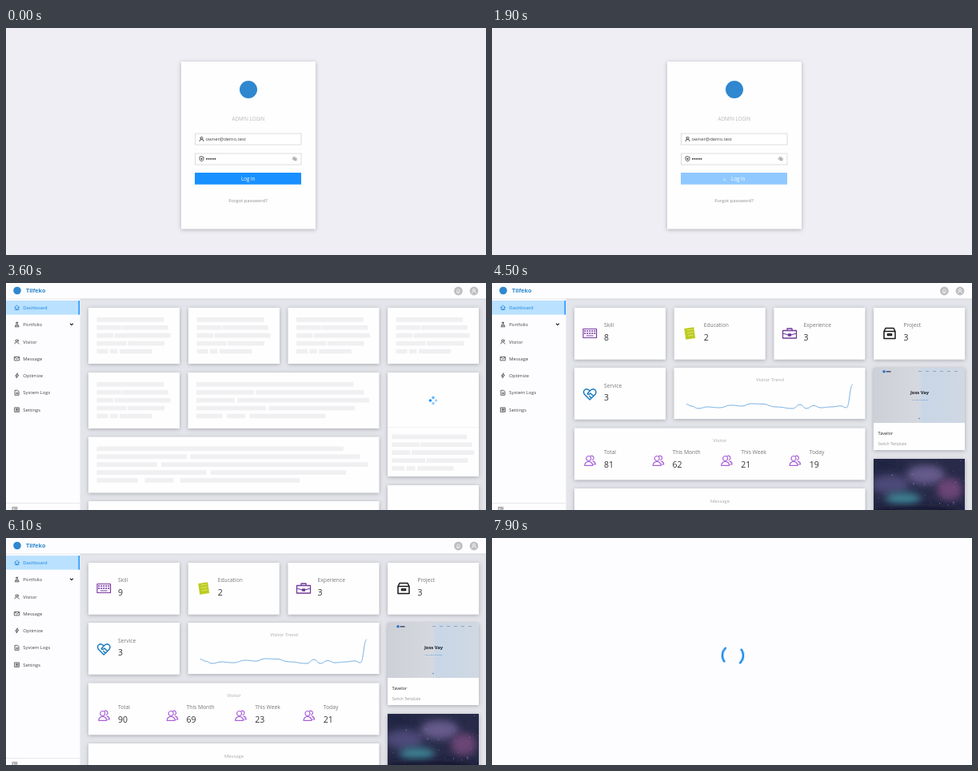
An HTML page that plays this animation: 600x284 px, repeating every 8 s.

```html
<!DOCTYPE html>
<html lang="en">
<head>
<meta charset="utf-8">
<title>Admin dashboard</title>
<style>
html, body { margin: 0; width: 100%; height: 100%; overflow: hidden; background: #fdfdff; }
svg { display: block; width: 100vw; height: 100vh; }
text { font-family: "Open Sans", "Noto Sans", sans-serif; font-size: 5.9px; fill: #444; }
.label { font-size: 6.7px; fill: #777; }
.num { font-size: 10.5px; fill: #333; }
.head { fill: #aaa; text-anchor: middle; }
.card { fill: #fefefe; filter: drop-shadow(0 1.6px 2.6px rgba(40, 42, 55, .32)); }
.icon { fill: none; stroke: #444; stroke-width: .8; stroke-linecap: round; stroke-linejoin: round; }

/* scenes switch hard */
.scene { visibility: hidden; animation: 8s step-end infinite; }
#login { animation-name: login; }
#idle { animation-name: idle; }
#busy { animation-name: busy; }
#loader { animation-name: loader; }
#shell { animation-name: shell; }
#skeleton { animation-name: skeleton; }
#content { animation-name: content; }
@keyframes login { 0% { visibility: visible } 36.25%, 100% { visibility: hidden } }
@keyframes idle { 0% { visibility: visible } 12.5%, 100% { visibility: hidden } }
@keyframes busy { 0% { visibility: hidden } 12.5% { visibility: visible } 36.25%, 100% { visibility: hidden } }
@keyframes loader {
  0% { visibility: hidden } 37.5% { visibility: visible }
  42.5% { visibility: hidden } 90.6% { visibility: visible } 100% { visibility: hidden }
}
@keyframes shell { 0% { visibility: hidden } 42.5% { visibility: visible } 87.5%, 100% { visibility: hidden } }
@keyframes skeleton { 0% { visibility: hidden } 42.5% { visibility: visible } 47.5%, 100% { visibility: hidden } }
@keyframes content { 0% { visibility: hidden } 47.5% { visibility: visible } 87.5%, 100% { visibility: hidden } }
.spin { animation: spin 8s linear infinite; }
@keyframes spin { from { transform: rotate(-2365deg) } to { transform: rotate(35deg) } }
</style>
</head>
<body>
<svg id="stage" viewBox="0 0 600 284" preserveAspectRatio="none"></svg>
<script>
const LOOP = 8000, COUNT_START = 3836, COUNT_TIME = 2000;
const BLUE = '#1890ff';

const rect = (x, y, w, h, attrs = '') => `<rect x="${x}" y="${y}" width="${w}" height="${h}" ${attrs}/>`;
const dot = (x, y, r, fill) => `<circle cx="${x}" cy="${y}" r="${r}" fill="${fill}"/>`;
const text = (x, y, s, attrs = '') => `<text x="${x}" y="${y}" ${attrs}>${s}</text>`;
const card = (x, y, w, h) => rect(x, y, w, h, 'class="card" rx=".6"');
const at = (x, y, body) => `<g transform="translate(${x} ${y})">${body}</g>`;
const icon = (x, y, d, color = '#444', width = .8) =>
  at(x, y, `<path class="icon" d="${d}" style="stroke:${color};stroke-width:${width}"/>`);
const scene = (id, body) => `<g id="${id}" class="scene">${body}</g>`;
const spinner = (x, y, body) => at(x, y, `<g class="spin">${body}</g>`);

const USER = 'M-1.5 -1.3a1.5 1.5 0 1 0 3 0a1.5 1.5 0 1 0 -3 0M-2.5 2.6a2.5 2.5 0 0 1 5 0';

function login() {
  const field = y => rect(236.5, y, 132.5, 14, 'fill="#fff" stroke="#d4d4da" stroke-width=".8"');
  const button = fill => rect(236, 181, 133, 14.8, `fill="${fill}" rx=".6"`);
  const white = 'style="fill:#fff;font-size:6.2px"';
  let bullets = '';
  for (let i = 0; i < 5; i++) bullets += dot(251 + i * 2.6, 163.7, .95, '#333');
  return rect(0, 0, 600, 284, 'fill="#eeeef4"') + card(219, 42, 168, 209.5)
    + dot(303, 77, 11, '#2f87cf')
    + text(303, 116, 'ADMIN LOGIN', 'class="head" style="font-size:6.2px;fill:#b8b8bc"')
    + field(132) + icon(244.5, 139, USER, '#333') + text(249.5, 141, 'owner@demo.test')
    + field(157) + icon(244.5, 163.7, 'M0 -3L2.5 -2V.5Q2.3 2.2 0 3Q-2.3 2.2 -2.5 .5V-2ZM0 -.8V1M-.8 0H.8', '#333')
    + bullets + icon(361, 163.7, 'M-3 0Q0 -4 3 0Q0 4 -3 0M-1 0a1 1 0 1 0 2 0a1 1 0 1 0 -2 0M-2.2 -2.4L2.2 2.4', '#888', .7)
    + scene('idle', button(BLUE) + text(294, 190.8, 'Log in', white))
    + scene('busy', button('#8fc9ff') + text(299, 190.8, 'Log in', white)
      + spinner(292, 188.7, '<path class="icon" d="M-2.2 0A2.2 2.2 0 0 0 0 2.2" style="stroke:#fff"/>'))
    + text(302.5, 218.2, 'Forgot password?', 'class="head" style="fill:#8d8d92"');
}

function shell() {
  const menu = [
    ['Dashboard', 'M-3 0L0 -2.8L3 0M-2 -.6V2.7H2V-.6M0 2.7V.8'],
    ['Portfolio', 'M-1 -2.8H1M-.7 -2.8V-.5L-2.5 2.7H2.5L.7 -.5V-2.8M-1.6 1H1.6'],
    ['Visitor', 'M-1.7 -1.3a1.3 1.3 0 1 0 2.6 0a1.3 1.3 0 1 0 -2.6 0M-2.8 2.6Q-2.3 .3 -.4 .3L2.7 2.7M1.5 -2.4Q3 -1 1.5 .2'],
    ['Message', 'M-3 -2.2H3V2.2H-3ZM-3 -2L0 .5L3 -2'],
    ['Optimize', 'M.6 -3L-2 .4H0L-.8 3L2.2 -.9H.2Z'],
    ['System Logs', 'M-2.3 -3H1L2.4 -1.6V3H-2.3ZM-1 -.2H1.2M-1 1.3H1.2'],
    ['Settings', 'M-2.7 -2.7H2.7V2.7H-2.7ZM-1.4 -1.3H1.4M-1.4 0H1.4M-1.4 1.3H1.4']
  ];
  const items = menu.map(([name, d], i) => {
    const y = 30.8 + i * 21.3, color = i ? '#444' : '#1682d8';
    return icon(13.7, y, d, color) + text(21.3, y + 2.1, name, `style="fill:${color}"`);
  }).join('');
  return rect(0, 0, 600, 284, 'fill="#e4e5ea"')
    + rect(0, 0, 92.5, 284, 'fill="#fdfdff"')
    + rect(0, 0, 600, 19.5, 'fill="#fdfdff" style="filter:drop-shadow(0 .6px 1px rgba(60,60,75,.22))"')
    + dot(14, 9.5, 4.8, '#2f87cf')
    + text(25, 12.4, 'Tilfeko', 'style="font-size:7.2px;font-weight:700;fill:#2b87cd"')
    + dot(565.4, 10, 5.4, '#bfbfc3') + dot(585, 10, 5.4, '#bfbfc3')
    + icon(565.4, 10, 'M-1.6 1.6H1.6V-.5A1.6 1.6 0 0 0 -1.6 -.5ZM-.5 2.5H.5', '#fff', .7)
    + icon(585, 10, USER, '#fff', .7)
    + rect(0, 22, 92, 17.6, 'fill="#bae1ff"') + rect(90.6, 22, 1.5, 17.6, `fill="${BLUE}"`)
    + items + icon(82, 51.8, 'M-1.6 -.8L0 .8L1.6 -.8', '#222', 1.1)
    + rect(0, 275, 92, .6, 'fill="#dcdce0"') + icon(11, 282.5, 'M-3 -1.8H3M-.5 0H3M-3 1.8H3M-3 -.6L-2 0L-3 .6', '#444', .7);
}

function skeleton() {
  // bar starts and ends as fractions of the line
  const rows = [[0, .9], [0, .33, .34, .96], [0, .22, .235, .99], [0, .4, .415, .91], [0, .15, .175, .28, .305, .74]];
  const lines = (x, y, w) => rows.map((row, r) => {
    let out = '';
    for (let i = 0; i < row.length; i += 2)
      out += rect(x + row[i] * w, y + r * 9.9, (row[i + 1] - row[i]) * w, 5.7, 'fill="#f0f0f2"');
    return out;
  }).join('');
  const block = (x, y, w) => card(x, y, w, 70) + lines(x + 10.5, y + 12, w - 21);
  const dots = [[-3.6, 0, 1], [0, -3.6, .65], [3.6, 0, .4], [0, 3.6, .45]]
    .map(([x, y, o]) => `<circle cx="${x}" cy="${y}" r="1.8" fill="${BLUE}" opacity="${o}"/>`).join('');
  return [103, 228, 352.5, 477].map(x => block(x, 31, 114)).join('')
    + block(103, 112, 114) + block(227.5, 112, 239) + block(103, 192.5, 363.5) + block(103, 273, 363.5)
    + card(477, 112, 114, 130) + rect(477, 180, 114, .6, 'fill="#ebebee"') + lines(482.5, 189.5, 104)
    + spinner(534, 147, `<g transform="rotate(-155)">${dots}</g>`) + card(477, 253, 114, 70);
}

function stat(x, y, name, value) {
  return text(x, y, name, 'class="label"') + text(x, y + 16.6, 0, `class="num" data-value="${value}"`);
}

function trend() {
  const pts = [[243, 151.5], [249, 154], [258, 157], [269, 155], [284, 156], [299, 153], [313, 154], [323, 151], [337, 151.3],
    [355, 155], [376, 157], [385, 152], [393, 157], [402, 153.5], [411, 156], [424, 155], [436, 153.8], [443, 156], [451, 127]];
  let d = 'M' + pts[0];
  for (let i = 1; i < pts.length; i++) {
    const mid = (pts[i - 1][0] + pts[i][0]) / 2;
    d += `C${mid} ${pts[i - 1][1]} ${mid} ${pts[i][1]} ${pts[i]}`;
  }
  return `<path d="${d}" fill="none" stroke="#6aa9de" stroke-width=".9"/>`;
}

function preview() {
  let nav = '';
  for (let i = 0; i < 6; i++) nav += rect(533 + i * 9, 110.2, 4, .8, 'fill="#8e96a4"');
  return card(477, 106, 114, 103) + rect(477, 106, 114, 69, 'fill="url(#sky)"')
    + dot(490, 110.8, 1.7, '#2b6fd0') + rect(492.6, 110, 6, 1.6, 'fill="#4b587a"') + nav
    + text(534.5, 139, 'Joss Vay', 'text-anchor="middle" style="font-size:5.8px;font-weight:700;fill:#181c24"')
    + text(534.5, 147.2, 'I am a web developer', 'text-anchor="middle" style="font-size:2.2px;fill:#3a7fd0"')
    + dot(534, 169.5, .8, '#3a7fd0')
    + text(482.5, 189.7, 'Tavelor', 'style="font-size:5.6px;fill:#222"')
    + text(482.5, 203, 'Switch Template', 'style="font-size:4.7px;fill:#999"');
}

function galaxy() {
  let seed = 7, stars = '';
  const rnd = () => (seed = seed * 16807 % 2147483647) / 2147483647;
  for (let i = 0; i < 70; i++)
    stars += `<circle cx="${478 + rnd() * 112}" cy="${221 + rnd() * 62}" r="${.2 + rnd() * .4}" fill="#d5d4f2" opacity="${.2 + rnd() * .5}"/>`;
  const glow = (x, y, rx, ry, fill) => `<ellipse cx="${x}" cy="${y}" rx="${rx}" ry="${ry}" fill="${fill}" filter="url(#soft)"/>`;
  return card(477, 220, 114, 70) + `<g clip-path="url(#frame)">` + rect(477, 220, 114, 70, 'fill="#272a48"')
    + glow(498, 252, 24, 12, '#4d4878') + glow(542, 240, 24, 12, '#655a8b') + glow(572, 258, 16, 14, '#6b4474')
    + glow(514, 270, 22, 8, '#3d7f91') + glow(530, 286, 60, 7, '#15182d') + glow(490, 226, 18, 6, '#1c2140')
    + stars + '</g>';
}

function content() {
  const top = [['Skill', 9], ['Education', 2], ['Experience', 3], ['Project', 3]]
    .map(([name, n], i) => card(103 + i * 124.7, 31, 114, 64.7) + stat(140 + i * 124.8, 55.4, name, n)).join('');
  const people = 'M-4.5 -2.5a3 3 0 1 0 6 0a3 3 0 1 0 -6 0M-6.5 6.3a5 5 0 0 1 10 0ZM1 -5.5a2.7 2.7 0 1 1 2 5M4 1.2Q7 2 7 5H4.5';
  const visits = [['Total', 90], ['This Month', 69], ['This Week', 23], ['Today', 21]]
    .map(([name, n], i) => icon(122.3 + i * 85.4, 222, people, '#a862d8', 1.2) + stat(140 + i * 85.6, 214.2, name, n)).join('');
  const keys = [-3, 0].map(y => [-6, -3, 0, 3, 6].map(x => rect(x - .9, y - .9, 1.8, 1.8, 'fill="#7d3aa5"')).join('')).join('');
  const note = rect(-6, -7, 12, 14, 'fill="#bccb20" transform="rotate(-8)"')
    + '<path class="icon" d="M-3 -4L3 -5M-3 -.5L4 -1.5M-2 3L4 2" style="stroke:#e9ed8e"/>';
  return top
    + icon(122.3, 63, 'M-8.3 -5.5H8.3V5.5H-8.3ZM-4 3H4', '#7d3aa5', 1.2) + at(122.3, 63, keys)
    + at(247.2, 63, note)
    + icon(372, 63, 'M-8.5 -3.5H8.5V6H-8.5ZM-3 -3.5V-6H3V-3.5M-8.5 0L-1.5 2H1.5L8.5 0M-1.5 1H1.5V3H-1.5Z', '#713a9a', 1.3)
    + icon(497, 63, 'M-7 -2.5L-5 -6.5H5L7 -2.5V6.5H-7ZM-7 -2.5H7M-2.5 .8H2.5V2.6H-2.5Z', '#181818', 1.5)
    + card(103, 106, 114, 64.7) + stat(140, 130.8, 'Service', 3)
    + icon(122.3, 139, 'M0 7L-7 0Q-9 -4 -5.5 -6Q-2.5 -7 0 -4Q2.5 -7 5.5 -6Q9 -4 7 0ZM0 -4L-3 -.5Q-1.5 1.5 .8 -1L4.5 2.5M2 5L-.5 2.5', '#1476bd', 1.4)
    + card(227.5, 106, 239, 64) + text(347.5, 123.4, 'Visitor Trend', 'class="head"') + trend()
    + card(103, 181.5, 363.5, 64.7) + text(285, 199.3, 'Visitor', 'class="head"') + visits
    + card(103, 257, 363.5, 60) + text(285, 274.6, 'Message', 'class="head"')
    + preview() + galaxy();
}

const arcs = `<path d="M9.2 -9.2A13 13 0 0 1 9.2 9.2M-9.2 9.2A13 13 0 0 1 -9.2 -9.2" fill="none" stroke="#1d8de8" stroke-width="2.6"/>`;
const defs = `<defs>
  <linearGradient id="sky"><stop offset="0" stop-color="#cdd0d7"/><stop offset=".5" stop-color="#d5d8de"/>
    <stop offset=".53" stop-color="#c8d6e7"/><stop offset="1" stop-color="#d0d8e2"/></linearGradient>
  <filter id="soft" x="-50%" y="-80%" width="200%" height="260%"><feGaussianBlur stdDeviation="5"/></filter>
  <clipPath id="frame"><rect x="477" y="220" width="114" height="64"/></clipPath></defs>`;

document.getElementById('stage').innerHTML = defs + scene('login', login())
  + scene('shell', shell()) + scene('skeleton', skeleton()) + scene('content', content())
  + scene('loader', spinner(301, 147, arcs));

const counters = [...document.querySelectorAll('[data-value]')];
let start;

function tick(now) {
  start ??= now;
  const t = ((now - start) % LOOP - COUNT_START) / COUNT_TIME;
  const p = Math.min(1, Math.max(0, (1 - 2 ** (-10 * t)) * 1024 / 1023));
  for (const el of counters) el.textContent = Math.round(el.dataset.value * p);
  requestAnimationFrame(tick);
}
requestAnimationFrame(tick);
</script>
</body>
</html>
```
